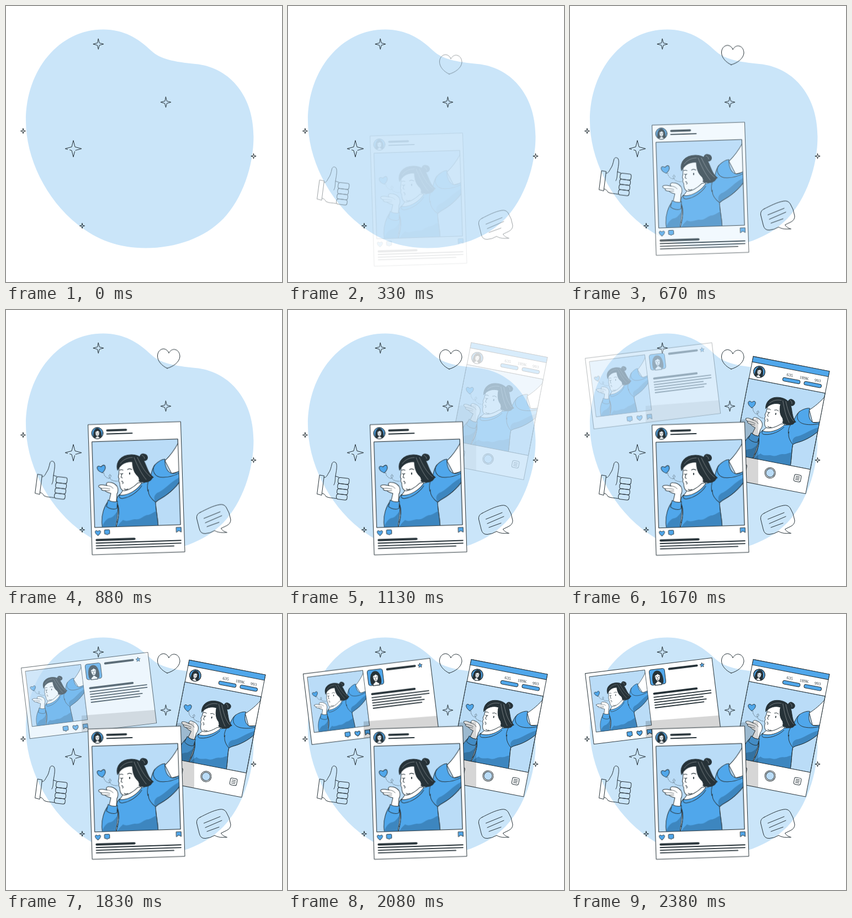
These frames come from a looping animation (500 px wide and 500 px high, 2.43 s). An HTML page:

```html
<!DOCTYPE html>
<html lang="en">
<head>
<meta charset="utf-8">
<title>Social posts</title>
<style>
  html, body { margin: 0; width: 100%; height: 100%; overflow: hidden; background: #fff; }
  svg { display: block; width: 100vw; height: 100vh; }

  .ink { fill: none; stroke: #263238; stroke-width: 1; stroke-linecap: round; stroke-linejoin: round; }
  .paper { fill: #fff; }
  .blue { fill: #50a7eb; }
  .pale { fill: #badcf7; }
  .deep { fill: #3d86bf; stroke: none; }
  .dark { fill: #263238; }
  .bold { stroke-width: 3.8; }
  .line { stroke-width: 1.8; }
  .fine { stroke-width: .7; }
  .shine { stroke: #fff; stroke-width: .45; opacity: .8; }
  .shade { fill: #000; opacity: .16; }
  text { font: 7.6px "Liberation Serif", serif; fill: #263238; text-anchor: middle; }

  .rise, .drop { animation: 2430ms cubic-bezier(.36, -.01, .5, 1.38) infinite; }
  .rise { --from: 30px; }
  .drop { --from: -30px; }
  /* the icons begin 33 ms into the shared curve */
  .icons { animation-name: icons; animation-timing-function: cubic-bezier(.347, .072, .499, 1.369); }
  .post { animation-name: post; }
  .phone { animation-name: phone; }
  .page { animation-name: page; }

  @keyframes icons {
    0% { opacity: 0; transform: translateY(var(--from)); }
    39.79%, 100% { opacity: 1; transform: translateY(0); }
  }
  @keyframes post {
    0%, 6.79% { opacity: 0; transform: translateY(var(--from)); }
    47.94%, 100% { opacity: 1; transform: translateY(0); }
  }
  @keyframes phone {
    0%, 36.42% { opacity: 0; transform: translateY(var(--from)); }
    77.57%, 100% { opacity: 1; transform: translateY(0); }
  }
  @keyframes page {
    0%, 56.38% { opacity: 0; transform: translateY(var(--from)); }
    97.53%, 100% { opacity: 1; transform: translateY(0); }
  }
</style>
</head>
<body>
<svg viewBox="0 0 500 500">
  <defs>
    <clipPath id="frame"><rect x="6" y="31.2" width="155.3" height="155.5"/></clipPath>
    <clipPath id="pageClip"><rect width="231.2" height="129" transform="translate(27.5 107.7) rotate(-7)"/></clipPath>
    <clipPath id="phoneClip"><rect width="140.6" height="226" transform="translate(332 82.3) rotate(11)"/></clipPath>
    <clipPath id="round"><circle r="10.3"/></clipPath>

    <path id="star" d="M0,-15 L3,-3.2 L15,0 L3,3.2 L0,15 L-3,3.2 L-15,0 L-3,-3.2Z" vector-effect="non-scaling-stroke"/>
    <path id="heart" d="M0,5 C-8,0 -5,-7 0,-2.4 C5,-7 8,0 0,5Z"/>
    <path id="note" d="M-3.5,-4.5 H3.5 Q4.7,-4.5 4.7,-3.3 V2 Q4.7,3.2 3.5,3.2 H1.5 L0,5 L-1.5,3.2 H-3.5 Q-4.7,3.2 -4.7,2 V-3.3 Q-4.7,-4.5 -3.5,-4.5Z"/>
    <path id="mark" d="M-4.3,-4.5 H4.3 V4.3 L0,1.5 L-4.3,4.3Z"/>

    <g id="face">
      <path class="dark" d="M-6.5,9 C-8,3 -7,-8.5 0,-8.6 C7,-8.5 8,3 6.5,9Z"/>
      <path class="paper" d="M-1.8,3 H1.8 V6.5 L4.5,8.5 V11 H-4.5 V8.5 L-1.8,6.5Z"/>
      <path class="paper" d="M-3.9,-2.5 C-2,-3 0,-4 .8,-5 C1.6,-3.6 3,-2.8 3.9,-2.5 C4.1,2 2.6,5.6 0,5.6 C-2.6,5.6 -4.1,2 -3.9,-2.5Z"/>
      <path class="fine" d="M-2.4,-.6 h1 M1.4,-.6 h1 M-.8,3 h1.6 M0,0 v1.3"/>
    </g>

    <g id="avatar">
      <circle class="blue" r="10.3"/>
      <g clip-path="url(#round)"><use href="#face"/></g>
      <circle r="10.3"/>
    </g>

    <g id="photo">
      <g clip-path="url(#frame)">
        <rect class="pale" x="6" y="31.2" width="155.3" height="155.5"/>
        <g class="ink" transform="rotate(1.85) translate(-149 -208.5)">
          <use href="#heart" class="blue" transform="translate(173 288.5) rotate(-12) scale(1.5)" stroke-width=".7"/>
          <path stroke-dasharray="1.3 2" class="fine" d="M177,296 C178,304 188,309 190,303 C191,297 184,298 188,305 C190,310 197,311 202,311"/>
          <!-- raised arm -->
          <path class="paper" d="M288,274 C296,266 306,254 315,236 L320,232 V292 L300,297Z"/>
          <!-- sweater -->
          <path class="blue" d="M206,335 C214,336 232,326 242,315 C250,316 258,310 262,303 C264,292 266,285 270,281 C275,276 282,271 288,271 C287,284 292,295 301,297 C307,297 312,294 318,290 V306 C312,318 296,334 281,342 C277,344 274,346 271,349 C271,362 275,374 276,398 H199 C204,380 207,362 201,350 C200,343 202,338 206,335Z"/>
          <path class="deep" d="M201,397 C203,389 207,386 212,381 C221,386 228,379 235,380 C245,381 249,372 258,372 C264,370 269,366 272,365 L276,397Z M271,349 C267,342 268,336 274,332 C284,329 295,316 306,309 C311,306 315,303 318,300 V306 C312,318 296,334 281,342Z"/>
          <path d="M271,349 C262,342 257,334 258,326 M262,303 C256,312 255,320 257,329 M270,281 C263,290 268,304 284,304 C294,304 306,301 318,294 M206,335 C204,341 207,343 212,342 C226,340 240,329 246,319 M318,306 C312,318 296,334 281,342 C277,344 274,346 271,349 C271,362 275,374 276,398 M201,350 C206,360 205,375 201,386"/>
          <!-- head -->
          <path class="dark" d="M243,270 C241,263 247,260 251,262 C256,263 258,268 255,272 C252,275 246,275 243,270Z"/>
          <path class="paper" d="M213,326 L238,309 L246,314 C240,325 222,338 206,336Z"/>
          <path class="paper" d="M205,284 L204.5,298 C203,303 203,305 205,306 C204,309 204,312 206,314 C206,320 207,326 212,328 C220,329 231,322 239,314 C246,314 247,306 241,306 L236,274 H210Z"/>
          <path class="dark" d="M202,291 C198,275 209,263 228,263 C241,263 249,270 253,281 C257,291 260,299 267,304 C263,305 265,309 259,311 C253,314 247,313 241,311 C243,305 239,302 236,299 C231,293 229,284 229,276 C218,275 208,280 202,291Z"/>
          <path class="shine" d="M232,268 C238,282 244,296 254,308 M238,268 C244,280 250,294 262,303 M229,268 C220,268 212,272 207,279 M246,264 C249,265 251,267 251,270"/>
          <path d="M207,297 q3,2 5,0 M206,291 q3,-2 6,0 M220,290 q4,-3 8,0 M210,297 L208.5,304 L211,305 M209,311 q3,-1 2,1.5 q3,1 0,3 M214,325 q4,2 7,0"/>
          <ellipse class="dark" cx="224" cy="297" rx="1.1" ry="2.2" stroke="none"/>
          <!-- near arm -->
          <path class="blue" d="M186,346 C178,356 172,372 174,390 L175,400 H199 C198,384 206,363 201,350Z"/>
          <path class="deep" d="M174,394 C178,383 183,378 190,377 C195,375 199,370 202,364 C200,377 197,386 199,398 H175Z"/>
          <path class="blue" d="M185,345 C190,348 196,349 202,347 L201,360 C196,363 187,361 182,357Z"/>
          <path class="paper" d="M168,319 C172,316 178,318 183,319 C180,316 183,312 187,313 C193,313 198,316 201,320 C204,325 203,331 201,334 L200,348 Q193,349 187,346 L190,333 C186,332 182,331 179,328 C174,328 171,326 173,324 C169,323 167,321 168,319Z"/>
          <path class="fine" d="M173,324 C179,323 184,324 188,325 M179,328 L188,328 M183,319 C188,319 192,321 194,324"/>
        </g>
      </g>
      <rect class="ink" x="6" y="31.2" width="155.3" height="155.5"/>
    </g>
  </defs>

  <path fill="#cae5f9" d="M36,208 C36,115 97,42.5 176,42.5 C214,42.5 240,59 263,81 C280,97 305,101 343,105 C400,110 448.5,157 448.5,237 C448.5,290 428,349 394,385 C360,420 308,438.5 253,438.5 C205,438.5 165,424 130,396 C72,350 36,275 36,208Z"/>

  <g class="ink">
    <use href="#star" transform="translate(122 258.5)" stroke-dasharray="36 3 26 4 200"/>
    <use href="#star" transform="translate(167.3 69) scale(.63)"/>
    <use href="#star" transform="translate(289.5 174.3) scale(.63)"/>
    <use href="#star" transform="translate(31 226.5) scale(.31)"/>
    <use href="#star" transform="translate(448.5 272) scale(.31)"/>
    <use href="#star" transform="translate(138 398.3) scale(.31)"/>
  </g>

  <g class="rise icons ink">
    <path d="M292,107 C283,103 274,94 274.5,84 C275,75 282,71 287,72 C291,73 294,76 295,79.5 C297,75 302,72 306,73 C312,74 315,80 315,86 C314,96 303,104 292,107Z"/>
    <!-- thumb -->
    <path d="M57.5,299 L65.5,300.5 L61,335.5 L53,333.5Z M65.2,303.5 C69,304 71,300 73,296 C77,291 78,285 79.5,279 C80.5,275 84,274 87,277 C90,281 87,294 86,301 L92,303 M86,301 C85,308 86,312 83,317 M61.5,332 C66,333 67,335 69,338 C74,341 81,340 87,341.5"/>
    <g transform="translate(91.5 303) rotate(7)">
      <rect width="20" height="11" rx="3.5"/>
      <rect x=".3" y="11" width="19.7" height="9.5" rx="3.5"/>
      <rect x=".4" y="20.5" width="19.6" height="9.5" rx="3.5"/>
      <rect x=".4" y="30" width="19.6" height="9.5" rx="3.5"/>
    </g>
    <!-- speech bubble -->
    <path d="M352,368 Q344.5,371 345.5,379 L350,397 Q352,407 361,406.5 Q370,406 378,401 C384,405 392,405 400.5,404.5 C395,403 391,400 389.5,397 L400,392 Q407.5,388 407,381 Q405,368 399,359 Q395,352.5 387,354 C375,356 362,363 352,368Z M358.5,379 L388,367 M361,387 L391,374 M364,394 L386,386"/>
  </g>

  <g class="drop page">
    <g class="ink" transform="translate(27.5 107.7) rotate(-7)">
      <rect class="paper" width="231.2" height="129"/>
      <use href="#photo" transform="translate(7 6.8) scale(.65) translate(-6 -31.2)"/>
      <rect class="blue" x="115.3" y="8" width="28" height="28" rx="4"/>
      <use href="#face" transform="translate(129.3 22.5) scale(1.3)"/>
      <path class="bold" d="M152,10.4 H202.5 M119.5,51.6 H197"/>
      <path class="line" d="M118.5,58 H222 M118.5,62.8 H222 M118.5,67.6 H207 M118.5,72.5 H212 M118.5,77.3 H207"/>
      <path class="blue" d="M212,6.5 l1.2,2.6 2.8,.3 -2.1,1.9 .6,2.8 -2.5,-1.4 -2.5,1.4 .6,-2.8 -2.1,-1.9 2.8,-.3Z" stroke-width=".8"/>
      <use href="#note" class="blue" x="66.6" y="119"/>
      <use href="#heart" class="blue" x="84.7" y="119"/>
      <use href="#mark" class="blue" x="102.7" y="119.4"/>
    </g>
    <path class="shade" clip-path="url(#pageClip)" d="M137,194 L280,183 V230 H137Z"/>
  </g>

  <g class="drop phone">
    <g class="ink" transform="translate(332 82.3) rotate(11)">
      <rect class="paper" width="140.6" height="226"/>
      <rect class="blue" width="140.6" height="10"/>
      <use href="#avatar" x="16" y="25.4"/>
      <g stroke="none">
        <text x="71.3" y="23.2">635</text>
        <text x="98.1" y="23.2">189K</text>
        <text x="122.7" y="23.2">993</text>
      </g>
      <rect class="blue" x="60.2" y="26.7" width="32" height="6.4" rx="3.2"/>
      <rect class="blue" x="99.5" y="26.3" width="32" height="6.4" rx="3.2"/>
      <use href="#photo" transform="translate(0 40.5) scale(.905) translate(-6 -31.2)"/>
      <circle class="paper" cx="70.2" cy="201.3" r="9.6"/>
      <circle class="pale" cx="70.2" cy="201.3" r="7.6"/>
      <rect x="14" y="195" width="12.5" height="12.5" rx="3"/>
      <rect x="114.5" y="195" width="12.5" height="12.5" rx="3"/>
      <path d="M117.5,198.5 h6.5 M117.5,201.3 h6.5 M117.5,204.1 h6.5"/>
    </g>
    <path class="shade" clip-path="url(#phoneClip)" d="M280,198 L341,195 V330 H280Z"/>
  </g>

  <g class="rise post">
    <g class="ink" transform="translate(149 208.5) rotate(-1.85)">
      <rect class="paper" width="167.5" height="236"/>
      <use href="#avatar" x="16" y="16"/>
      <path class="bold" d="M34,11.6 H68 M15,209.5 H83" transform="translate(0 0)" visibility="hidden"/>
      <path class="bold" d="M34,11.6 H68 M8.5,209.5 H77"/>
      <path class="line" d="M33,18 H79 M7.5,215 H161 M7.5,219.8 H161 M7.5,224.6 H148"/>
      <use href="#photo"/>
      <use href="#heart" class="blue" x="11.2" y="196.3"/>
      <use href="#note" class="blue" x="27.8" y="196"/>
      <use href="#mark" class="blue" x="157.8" y="195.7"/>
    </g>
  </g>
</svg>
</body>
</html>
```
